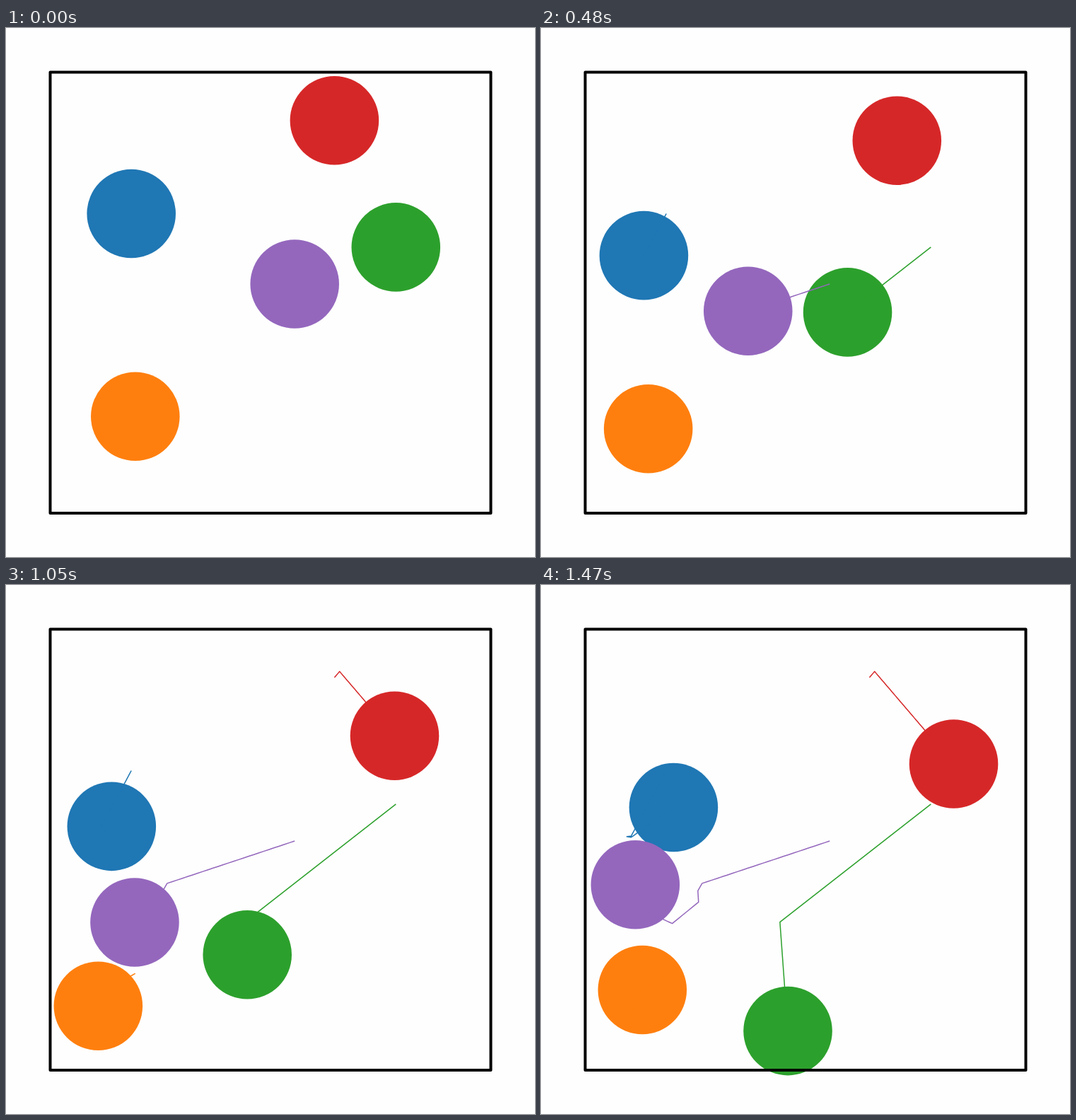
Recreate the animation shown at these times as an HTML page. Size 748 by 748 pixels, loop 1.5 s.

```html
<!DOCTYPE html>
<html lang="en">
<head>
<meta charset="utf-8">
<title>Bouncing discs</title>
<style>
  html, body { margin: 0; width: 100%; height: 100%; overflow: hidden; background: #fefefe; }
  svg { display: block; width: 100%; height: 100%; }
  polyline { fill: none; stroke-width: 1.5; stroke-linejoin: round; }
  rect { fill: none; stroke: #000; stroke-width: 4; stroke-linejoin: round; }
</style>
</head>
<body>
<svg viewBox="0 0 748 748">
  <g id="discs"></g>
  <g id="trails"></g>
  <rect x="62.5" y="62.5" width="623" height="623.4"/>
</svg>
<script>
const STEP = 30, STEPS = 50;
const RADIUS = 62.33, OUTLINE = 0.45;
const MIN = 125, MAX = 624; // range of disc centres inside the box

const ball = (color, x, y, vx, vy) => ({ color, x, y, vx, vy, path: [] });
const balls = [
  ball('#1f77b4', 177.2, 262.5, -1.986, 3.697),
  ball('#ff7f0e', 182.8, 549.3, -1.945, 1.095),
  ball('#2ca02c', 551.3, 309.9, -7.36, 5.75),
  ball('#d62728', 464.4, 130.8, 2.431, -2.841),
  ball('#9467bd', 408.2, 362, -7.216, 2.396)
];

// Elastic hit of equal masses: swap the speeds along the line of centres.
function collide(a, b) {
  const dx = b.x - a.x, dy = b.y - a.y, d = Math.hypot(dx, dy);
  if (d >= 2 * RADIUS) return;
  const nx = dx / d, ny = dy / d;
  const speed = (b.vx - a.vx) * nx + (b.vy - a.vy) * ny;
  if (speed >= 0) return;
  a.vx += speed * nx;
  a.vy += speed * ny;
  b.vx -= speed * nx;
  b.vy -= speed * ny;
}

function bounce(pos, v) {
  if (pos < MIN) return Math.abs(v);
  if (pos > MAX) return -Math.abs(v);
  return v;
}

function advance() {
  for (const b of balls) {
    b.x += b.vx;
    b.y += b.vy;
  }
  balls.forEach((a, i) => balls.slice(i + 1).forEach(b => collide(a, b)));
  for (const b of balls) {
    b.vx = bounce(b.x, b.vx);
    b.vy = bounce(b.y, b.vy);
  }
}

for (let i = 0; i < STEPS; i++) {
  for (const b of balls) b.path.push([b.x, b.y]);
  advance();
}

function add(parent, tag, attrs) {
  const el = document.createElementNS('http://www.w3.org/2000/svg', tag);
  for (const name in attrs) el.setAttribute(name, attrs[name]);
  return document.getElementById(parent).appendChild(el);
}

for (const b of balls) {
  b.disc = add('discs', 'circle', { r: RADIUS + OUTLINE, fill: b.color });
  b.trail = add('trails', 'polyline', { stroke: b.color });
}

function draw(step) {
  for (const { path, disc, trail } of balls) {
    const [x, y] = path[step];
    disc.setAttribute('cx', x);
    disc.setAttribute('cy', y);
    trail.setAttribute('points', path.slice(0, step + 1).join(' '));
  }
}

const start = performance.now();
function tick() {
  draw(Math.floor((performance.now() - start) / STEP) % STEPS);
  requestAnimationFrame(tick);
}
tick();
</script>
</body>
</html>
```
